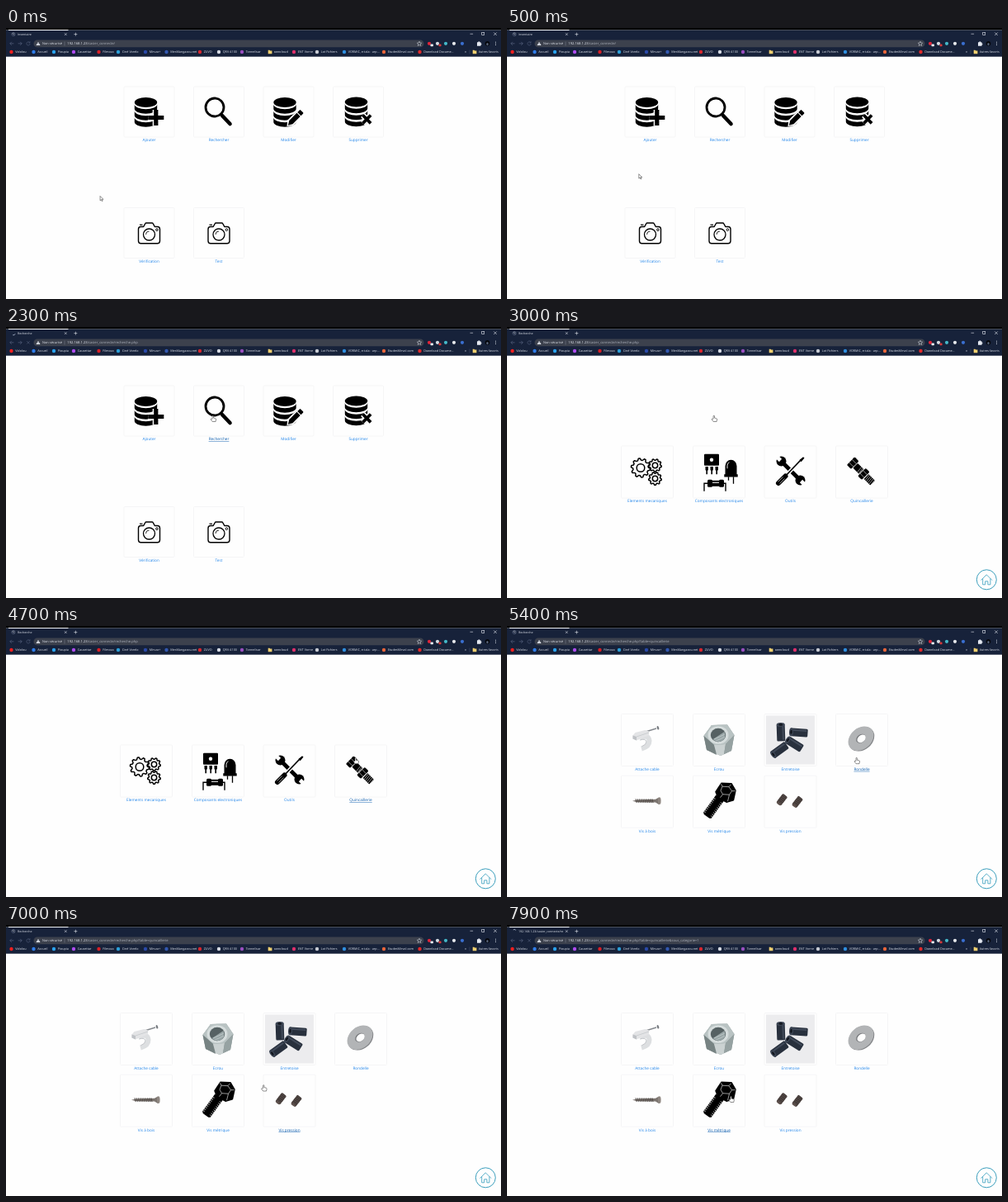
These frames come from a looping animation (600x328 px, 8 s). An HTML page:

```html
<!DOCTYPE html>
<html lang="fr">
<head>
<meta charset="utf-8">
<title>Inventaire</title>
<style>
html, body { margin: 0; width: 100%; height: 100%; overflow: hidden; background: #fefefe; }
svg { display: block; width: 100vw; height: 100vh; }
text { font-family: "Open Sans", "Noto Sans", sans-serif; text-rendering: geometricPrecision; white-space: pre; }
</style>
</head>
<body>
<svg id="stage" viewBox="0 0 600 328"></svg>
<script>
const LOOP = 8000;
const stage = document.getElementById('stage');

// ---- markup helpers ----
const rect = (x, y, w, h, fill, extra = '') =>
  `<rect x="${x}" y="${y}" width="${w}" height="${h}" fill="${fill}" ${extra}/>`;
const circle = (x, y, r, fill, extra = '') =>
  `<circle cx="${x}" cy="${y}" r="${r}" fill="${fill}" ${extra}/>`;
const ellipse = (x, y, rx, ry, fill, extra = '') =>
  `<ellipse cx="${x}" cy="${y}" rx="${rx}" ry="${ry}" fill="${fill}" ${extra}/>`;
const shape = (d, fill = '#000', extra = '') => `<path d="${d}" fill="${fill}" ${extra}/>`;
const line = (d, color, width, extra = '') =>
  `<path d="${d}" fill="none" stroke="${color}" stroke-width="${width}" ${extra}/>`;
const text = (x, y, size, fill, str, extra = '') =>
  `<text x="${x}" y="${y}" font-size="${size}" fill="${fill}" ${extra}>${str}</text>`;
const group = (transform, body) => `<g transform="${transform}">${body}</g>`;
const repeat = (n, fn) => Array.from({ length: n }, (_, i) => fn(i)).join('');
const ROUND = 'stroke-linecap="round" stroke-linejoin="round"';

// ---- icons, centred on 0,0 ----
const database = (x, y) => group(`translate(${x} ${y})`,
  ellipse(0, 0, 13.7, 6, '#000') +
  repeat(3, i => shape(`M-13.7 ${2.2 + i * 8}a13.7 6 0 0 0 27.4 0v5.6a13.7 6 0 0 1-27.4 0z`)));

const cased = (d, width, gap) => line(d, '#fefefe', width + gap) + line(d, '#000', width);

const add = () => database(-4, -11.5) + cased('M8.3-2.5v19M-1.2 7h19', 5.2, 3);
const search = () =>
  circle(-5, -5.5, 11, 'none', 'stroke="#000" stroke-width="2.8"') +
  line('M4 4.5L13.5 14.5', '#000', 4.6, ROUND);
const edit = () => database(-4.5, -11.5) +
  group('translate(7.5 8) rotate(-45)',
    shape('M-13.5 0l6-4.8h20.5v9.6h-20.5z', '#fefefe') +
    shape('M-11.5 0l5-3h13v6h-13zM7.6-3h3.6q1 0 1 1v4q0 1-1 1h-3.6z'));
const remove = () => database(-2.5, -12) + cased('M5.5 4l9.6 9.8M15.1 4L5.5 13.8', 3.8, 3);

const camera = () =>
  line('M-10-7.5h3.2l2-3.7q.4-.8 1.3-.8h7q.9 0 1.3.8l2 3.7h3.2q3 0 3 3V9.7q0 3-3 3h-20q-3 0-3-3V-4.5q0-3 3-3z', '#000', 1.4, ROUND) +
  line('M-11.5-9.8h3.5', '#000', 1.2) +
  circle(0, 2, 7, 'none', 'stroke="#000" stroke-width="1.3"') +
  line('M-4 2a4 4 0 0 1 4-4', '#000', .8) +
  circle(9.4, -3.8, 1.3, 'none', 'stroke="#000" stroke-width="1"');

function gear(x, y, r, teeth, hole) {
  const pts = [];
  for (let i = 0; i < teeth * 4; i++) {
    const a = (i + .5) / (teeth * 4) * 2 * Math.PI;
    const d = i % 4 < 2 ? r : r * .8;
    pts.push(`${(x + d * Math.cos(a)).toFixed(2)} ${(y + d * Math.sin(a)).toFixed(2)}`);
  }
  return shape(`M${pts.join('L')}z`, '#fefefe', 'stroke="#000" stroke-width="1.5" stroke-linejoin="round"') +
    circle(x, y, hole, 'none', 'stroke="#000" stroke-width="1.5"');
}
const gears = () => gear(-8, -5, 11.6, 10, 4.8) + gear(9.5, -8, 7.8, 9, 3.2) + gear(9.5, 8, 7.8, 9, 3.2);

const parts = () => group('translate(0 .8)',
  rect(-18, -22.5, 18, 14, '#000', 'rx="1"') + circle(-9, -15.5, 2.2, '#fefefe') +
  repeat(3, i => shape(`M${-16.5 + i * 6}-7.2h3.4v4l-.9 1v4.2h-1.6v-4.2l-.9-1z`)) +
  shape('M7.5 2v-10a7 7.5 0 0 1 14 0v10h1.2v3.2h-16.4V2z') +
  line('M10-5v-3.5a4.3 4.3 0 0 1 2.5-4', '#fefefe', .9) +
  line('M11.5 5v4.5M17.5 5v8.5', '#000', 1.3) +
  line('M-18 22.5V13h26v9.5', '#000', 1.4) +
  rect(-14, 8.5, 6, 9, '#000', 'rx="1.5"') + rect(0, 8.5, 6, 9, '#000', 'rx="1.5"') +
  rect(-10, 9.5, 12, 7, '#000') + line('M-8 12h8', '#fefefe', 1));

const tools = () =>
  line('M-10-12L11 9', '#000', 4.8) +
  circle(-11, -13, 6, '#000') + circle(12, 10, 6, '#000') +
  line('M-12-14L-18-20M13 11L19 17', '#fefefe', 4.6) +
  line('M-16 15L-6 5L12-14', '#fefefe', 4.5) +
  line('M-14.5 13.5L-6 5', '#000', 6, ROUND) +
  line('M-7 6L13-15', '#000', 1.8) + shape('M11-14.5l4.5-3.8 1.5 1.3-3.8 4.8z') +
  line('M-15 12l6-6M-13 14l6-6', '#fefefe', .6);

const bolt = () => group('rotate(45) scale(.9)',
  rect(-21, -7.5, 8, 15, '#000', 'rx="1.5"') + rect(-12.2, -4.5, 33, 9, '#000', 'rx="1"') +
  repeat(11, i => line(`M${-5 + i * 2.5}-4.5l1 9`, '#fefefe', .6)) +
  rect(-1, -8.2, 9.5, 16.4, '#fefefe') + rect(0, -7.5, 7.5, 15, '#000', 'rx="1.5"') +
  line('M0-2.6h7.5M0 3h7.5M-21-2.6h8M-21 3h8', '#fefefe', .6));

const clip = () =>
  line('M-2-10L11-14', '#85898e', 1.4) + ellipse(13, -14.7, 1.2, 2.3, '#777b80', 'transform="rotate(-18 13 -14.7)"') +
  line('M-9-3q11-4 11.5 4 0 7-9.5 9.5', '#dddfe1', 6) +
  line('M-9 0q7.5-2 8 2 0 3.5-5.5 5.8', '#c2c5c9', 1) +
  shape('M-17.5-5.5l3-3.5 12-3 4.5 1.5v5l-15 6-4.5-2z', '#e3e4e6') +
  shape('M-17.5-5.5l4.5 1.5v4.5l-4.5-2z', '#bfc2c6') + line('M-13-4L2-9', '#c6c9cc', .8);

const nut = () =>
  shape('M-18.5-5L-9-18 10-18.5 18.5-6 15 13 2 19-15 12z', '#8d9999') +
  shape('M-18.5-5L-9-18 10-18.5 18.5-6 8 5-6 6z', '#b9c3c3') +
  shape('M-18.5-5L-6 6-3 18-15 12z', '#778383') +
  shape('M-6 6L8 5 6 17.3 2 19-3 17z', '#cbd2d2') + shape('M8 5L18.5-6 15 13 6 17.3z', '#96a2a2') +
  ellipse(-1, -6, 12.5, 10.8, '#d6dddd') + ellipse(-1, -6, 9.2, 8.3, '#566163') +
  shape('M-7.5-1q8-5 14-9 3 9-4 11.5-6 2-10-2.5z', '#98a5a6') +
  line('M-6-1q7-3 13-6M-4 1q6-2 11-5', '#c9d1d1', .7);

const spacer = (x, y, a) => group(`translate(${x} ${y}) rotate(${a})`,
  rect(-10.5, -5, 21, 10, '#28303d', 'rx="1.5"') + rect(-9, -3.6, 18, 2, '#414a59') +
  ellipse(-9.5, 0, 2.5, 5, '#3b4453') + ellipse(-9.5, 0, 1.2, 2.5, '#10141b'));
const spacers = () => rect(-29.5, -29.5, 59, 59, '#ececee') +
  spacer(-11.5, -9, 88) + spacer(10.5, -9, 4) + spacer(-13, 12, -36) + spacer(5, 5, 32);

const washer = () => group('translate(-1 -1.8) rotate(-40)',
  ellipse(.2, 1, 17, 13, '#808285') + ellipse(0, 0, 17, 12.8, '#b2b4b6') +
  ellipse(0, 0, 6.4, 4.8, '#76787b') + ellipse(.4, .5, 5.8, 4.1, '#fefefe'));

const woodScrew = () => group('translate(0 -1)',
  shape('M-18 0l5-1.3 23-.6 4-2.3v8.4l-4-2.3-23-.6z', '#7b746f') +
  repeat(10, i => line(`M${-14 + i * 2.2}-2.4l1.2 4.8`, '#46403d', .9)) +
  ellipse(14.8, 0, 1.8, 4.4, '#8f8781'));

const metricScrew = () =>
  group('translate(0 -3) rotate(-54)',
    shape('M-24-6h26v12h-26l-1.5-2v-8z') +
    repeat(9, i => line(`M${-23 + i * 2.5}-6.1l.8 2.2M${-22.5 + i * 2.5} 6.1l.8-2.2`, '#fefefe', .7))) +
  shape('M-4-12L3-22.5 15-22 20-13.5 17.5-2 9 .5-1-4.5z', '#000', 'stroke="#000" stroke-width="1.5" stroke-linejoin="round"') +
  line('M4-18.5l8 .5 3.5 5-3 4.5-8-.5-2.5-4.5zM4-18.5l-1.5-3M12-18l2.5-3M15.5-13h4M4.5-9l-3 4M12.5-8.5l-2 8', '#fefefe', .6);

const grub = (x, y) => group(`translate(${x} ${y}) rotate(-52)`,
  rect(-6.5, -3.6, 13, 7.2, '#3f3735', 'rx="1.4"') +
  repeat(5, i => line(`M${-4 + i * 2.2}-3.6l.6 7.2`, '#6e625d', .5)) +
  ellipse(-6, 0, 1.5, 3.3, '#5d504c'));
const grubs = () => grub(-10.2, -2.6) + grub(8.6, 0);

// ---- pages: [centre x, centre y, label, art] ----
const pages = [
  { half: 30.5, drop: 35.7, cells: [
    [173.5, 101.5, 'Ajouter', add], [258, 101.5, 'Rechercher', search],
    [342.5, 101.5, 'Modifier', edit], [427, 101.5, 'Supprimer', remove],
    [173.5, 248, 'Vérification', camera], [258, 248, 'Test', camera]] },
  { half: 31.5, drop: 36.7, home: true, cells: [
    [170, 175.5, 'Elements mecaniques', gears], [257, 175.5, 'Composants electroniques', parts],
    [343.5, 175.5, 'Outils', tools], [430, 175.5, 'Quincaillerie', bolt]] },
  { half: 31.5, drop: 36.8, home: true, cells: [
    [170, 138, 'Attache cable', clip], [257, 138, 'Ecrou', nut],
    [343.5, 138, 'Entretoise', spacers], [430, 138, 'Rondelle', washer],
    [170, 212.7, 'Vis à bois', woodScrew], [257, 212.7, 'Vis métrique', metricScrew],
    [343.5, 212.7, 'Vis pression', grubs]] }
];

const homeButton = () => group('translate(581.3 305.8)',
  circle(0, 0, 12, '#fefefe', 'stroke="#3b9fbd" stroke-width="1"') +
  line('M-6.5 .5L0-6 6.5 .5M-4.6-1v7h3V2h3.2v4h3V-1', '#4aa8c4', .9, ROUND));

const pageMarkup = p => '<g class="page">' + p.cells.map(([x, y, label, art]) =>
  rect(x - p.half, y - p.half, 2 * p.half, 2 * p.half, '#fefefe', 'rx="1" stroke="#ecedef" stroke-width=".5"') +
  group(`translate(${x} ${y})`, art()) +
  text(x, y + p.drop, 4.7, '#1f84ea', label, 'class="label" text-anchor="middle"')).join('') +
  (p.home ? homeButton() : '') + '</g>';

// ---- browser window ----
const INK = '#e4e8f0', DIM = '#56627e', BAR = '#17223a', FIELD = '#3c414d';
const bookmarks = [
  [6.5, 'Vidolou', '#f02020'], [33.5, 'Accueil', '#2f7de8'], [58, 'Pioupia', '#2aa3ef'],
  [82, 'Causettar', '#b04cf0'], [112.5, 'Filmoza', '#d81f26'], [136, 'Ciné Vorelo', '#2c9fd8'],
  [169, 'Mirvaz+', '#2a49a8'], [194.5, 'MesMangazou.net', '#3358b0'], [235, 'ZUVO', '#d9272e'],
  [258, 'QRV-4100', '#d8dce4'], [286, 'Tonnelivar', '#9a4fc0'], [320, 'owncloud', '#f0d070', 1],
  [349, 'ENT Vorne', '#e0306a'], [377, 'Lot Fichiers', '#c8ccd4'], [410, 'VORMIC, e-tala - arp...', '#2f8fe0'],
  [458, 'EtudesMirvol.com', '#e8663a'], [501.5, 'Download Docume...', '#e02a2a'], [568, 'Autres favoris', '#f0d070', 1]
];
const extensions = [[513, '#e0253a'], [523, '#d4dbe2'], [533, '#45b8c8'], [543, '#e6e8ec'], [553, '#3a6fd0']];

const chrome = () =>
  rect(0, 0, 600, 2.5, '#000') + rect(0, 2.5, 600, 32.2, BAR) +
  line('M3 2.5h72.5', '#f4f5f7', 1) +
  rect(33.5, 14.5, 473, 8.8, FIELD, 'rx="4.4"') +
  line('M71 6.3l2.6 2.6M73.6 6.3L71 8.9M82.4 7.6h4M84.4 5.6v4', INK, .6) +
  line('M562.5 7.2h3.6M591.2 5.4l3.6 3.6M594.8 5.4l-3.6 3.6', INK, .6) +
  rect(576.7, 5.6, 3, 3, 'none', `stroke="${INK}" stroke-width=".6"`) +
  line('M9.4 18.8H4.8m2-2l-2 2 2 2M14.6 18.8h4.6m-2-2l2 2-2 2', DIM, .7) +
  shape('M39 16.7l2.5 4.3h-5z', INK) + line('M39 18v1.5M39 20v.5', FIELD, .5) +
  text(44, 20.3, 3.95, INK, 'Non sécurisé') + line('M71 16.5v5', '#7c8290', .5) +
  shape('M501 16.2l.8 1.8 1.9.2-1.4 1.3.4 1.9-1.7-1-1.7 1 .4-1.9-1.4-1.3 1.9-.2z', 'none', `stroke="${INK}" stroke-width=".5"`) +
  extensions.map(([x, c]) => circle(x, 18.8, 2.1, c)).join('') +
  rect(514.5, 19.6, 3.4, 2.6, '#e8eaee', 'rx=".6"') + rect(524.5, 19.6, 3, 2.6, '#d23a3a', 'rx=".6"') +
  shape('M571 17.2h1.3a1 1 0 0 1 2 0h1.2v1.4a1 1 0 0 1 0 2v1.2h-4.5z', INK) +
  circle(583.5, 18.8, 2.8, '#05070c') + ellipse(583.5, 19.6, 1.2, 1.7, '#58657c') +
  repeat(3, i => circle(593.5, 17 + i * 1.8, .5, INK)) +
  bookmarks.map(([x, name, c, folder]) =>
    (folder ? shape(`M${x - 2.3} 26.8h1.8l.7.8h2.2v3.6h-4.7z`, c) : circle(x, 29, 2.2, c)) +
    text(x + 4.7, 30.4, 3.75, INK, name)).join('') +
  text(556, 30.3, 4.2, INK, '»') + line('M562 26.5v5', DIM, .4);

const clipDef = '<clipPath id="tabClip"><rect x="13" y="3" width="55" height="10"/></clipPath>';
stage.innerHTML = `<defs>${clipDef}</defs>` + rect(0, 0, 600, 328, '#fefefe') +
  pages.map(pageMarkup).join('') + chrome() +
  `<g clip-path="url(#tabClip)">${text(14, 8.9, 3.6, INK, '', 'id="tab"')}</g>` +
  `<text x="74.3" y="20.3" font-size="4.1" fill="${INK}">192.168.1.23<tspan id="path" fill="#b0b5bf"></tspan></text>` +
  `<g id="globe">${circle(9, 7.6, 2.1, 'none', `stroke="${DIM}" stroke-width=".7"`)}${line('M7.2 7h2l.6 1.6M9 5.6l1 1', INK, .5)}</g>` +
  line('M9 5.4a2.2 2.2 0 0 1 2.2 2.2', '#aeb9d0', .8, 'id="spinner"') +
  line('M28.6 17.5a2.1 2.1 0 1 0 .5 1.6M29 16.2v1.7h-1.7', DIM, .6, 'id="reload"') +
  line('M25.3 17.1l3.4 3.4M28.7 17.1l-3.4 3.4', DIM, .6, 'id="stop"') +
  `<g id="arrow">${shape('M0 0v5.4l1.3-1.2.9 2 .9-.4-.9-1.9h1.7z', '#fff', 'stroke="#222" stroke-width=".5"')}</g>` +
  `<g id="hand">${shape('M-.7 3.9V.6a.7.7 0 0 1 1.4 0v2.2l2.3.5q.9.3.8 1.2l-.5 2.7H-.6l-2-2.6q-.2-.9.8-.7z', '#fff', 'stroke="#222" stroke-width=".5"')}</g>`;

// ---- timeline ----
const BASE = '/casier_connecte/';
const SEARCH = BASE + 'recherche.php';
const TABLE = SEARCH + '?table=quincaillerie';
const LOADING = '192.168.1.23' + SEARCH;

// start, page, tab title, path, loading
const steps = [
  [0, 0, 'Inventaire', BASE, false],
  [2000, 0, LOADING, SEARCH, true],
  [2200, 0, 'Recherche', SEARCH, true],
  [2400, 1, 'Recherche', SEARCH, false],
  [4800, 1, LOADING, TABLE, true],
  [5100, 1, 'Recherche', TABLE, true],
  [5200, 2, 'Recherche', TABLE, false],
  [7500, 2, LOADING, TABLE + '&sous_categorie=1', true]
];

// time, x, y of the pointer tip
const track = [
  [0, 114, 203.5], [1000, 205.5, 150], [1700, 250.8, 107.3], [3300, 250.8, 107.3],
  [4100, 423.7, 159.5], [5600, 423.7, 159.5], [6400, 401, 164.5], [6500, 401, 164.5],
  [7300, 271.5, 207.3], [LOOP, 271.5, 207.3]
];

function pointer(t) {
  const i = track.findIndex(k => k[0] > t);
  const [t0, x0, y0] = track[i - 1], [t1, x1, y1] = track[i];
  let u = (t - t0) / (t1 - t0);
  if (t >= 1700) u = u * u * (3 - 2 * u);
  return [x0 + (x1 - x0) * u, y0 + (y1 - y0) * u];
}

const el = id => document.getElementById(id);
const pageEls = [...stage.querySelectorAll('.page')];
const labelEls = pageEls.map(p => [...p.querySelectorAll('.label')]);
const show = (node, on) => node.setAttribute('visibility', on ? 'visible' : 'hidden');

function render(t) {
  const [, page, title, path, loading] = steps.filter(s => s[0] <= t).pop();
  const [x, y] = pointer(t);
  const { half, cells } = pages[page];
  const hover = cells.findIndex(([cx, cy]) =>
    Math.abs(x - cx) <= half && y >= cy - half && y <= cy + half + 7);

  pageEls.forEach((p, i) => p.setAttribute('display', i === page ? 'inline' : 'none'));
  labelEls[page].forEach((label, i) => {
    label.setAttribute('text-decoration', i === hover ? 'underline' : 'none');
    label.setAttribute('fill', i === hover ? '#0b5cad' : '#1f84ea');
  });

  el('tab').textContent = title;
  el('path').textContent = path;
  show(el('globe'), !loading);
  show(el('spinner'), loading);
  show(el('reload'), !loading);
  show(el('stop'), loading);
  el('spinner').setAttribute('transform', `rotate(${t * .36 % 360} 9 7.6)`);

  // the pointer keeps its shape until it moves again
  const hand = hover >= 0 || (t >= 1700 && t < 3350);
  show(el('hand'), hand);
  show(el('arrow'), !hand);
  el(hand ? 'hand' : 'arrow').setAttribute('transform', `translate(${x.toFixed(2)} ${y.toFixed(2)})`);
}

const start = performance.now();
function tick() {
  render((performance.now() - start) % LOOP);
  requestAnimationFrame(tick);
}
tick();
</script>
</body>
</html>
```
